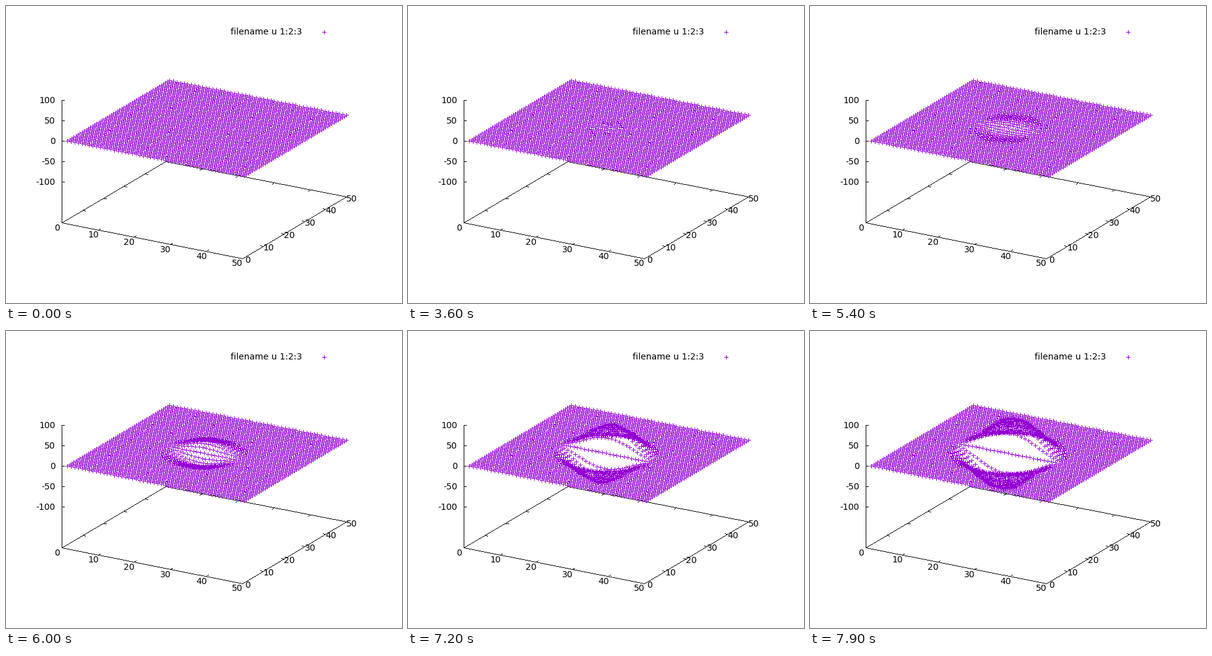
Recreate the animation shown at these times as a matplotlib script. Size 640x480 px, loop 8000 ms.

```python
import numpy as np
import matplotlib.pyplot as plt
from matplotlib.animation import FuncAnimation

plt.rcParams["path.simplify"] = False
plt.rcParams["font.family"] = "DejaVu Sans"

W, H, DPI = 640, 480, 100
FRAMES, STEP = 80, 100
PURPLE = "#9400d3"

# Screen vectors of the projected axes, in pixels
ORIGIN = np.array([90.0, 350.3])
X_AXIS = np.array([291.6, 57.4])
Y_AXIS = np.array([168.4, -99.4])
Z_HEIGHT = 198.5
SPAN = 50
CENTER = 25
TICK = 4.4

fig = plt.figure(figsize=(W / DPI, H / DPI), dpi=DPI, facecolor="white")
ax = fig.add_axes([0, 0, 1, 1])
ax.set_xlim(0, W)
ax.set_ylim(H, 0)
ax.axis("off")


def project(x, y):
    """Position on the base plane in pixels."""
    return (ORIGIN[0] + (x * X_AXIS[0] + y * Y_AXIS[0]) / SPAN,
            ORIGIN[1] + (x * X_AXIS[1] + y * Y_AXIS[1]) / SPAN)


def stroke(xs, ys, color="black"):
    line, = ax.plot(xs, ys, color=color, lw=72 / DPI, antialiased=False,
                    solid_capstyle="butt", snap=False)
    return line


def segment(p, q):
    """Jagged one-pixel line, drawn as a row of whole pixels."""
    p, q = np.rint(p), np.rint(q)
    n = int(np.abs(q - p).max()) + 1
    xs, ys = np.rint(np.linspace(p, q, n)).T
    gap = np.full(n, np.nan)
    stroke(np.stack([xs, xs + 1, gap], axis=1).ravel(),
           np.repeat(ys + 0.5, 3))


def label(x, y, text, ha="center"):
    ax.text(x, y + 5, text, ha=ha, va="baseline", fontsize=14 * 72 / DPI)


def crosses(cx, cy):
    """Broken polyline of 7-pixel plus signs centred on whole pixels."""
    cx, cy = np.rint(cx).ravel(), np.ceil(cy).ravel()
    gap = np.full(cx.shape, np.nan)
    xs = np.stack([cx - 3, cx + 4, gap, cx + 0.5, cx + 0.5, gap], axis=1)
    ys = np.stack([cy + 0.5, cy + 0.5, gap, cy - 3, cy + 4, gap], axis=1)
    return xs.ravel(), ys.ravel()


def draw_axes():
    corners = [project(*c) for c in
               ((0, 0), (SPAN, 0), (SPAN, SPAN), (0, SPAN), (0, 0))]
    for p, q in zip(corners, corners[1:]):
        segment(p, q)

    along_y = TICK * Y_AXIS / np.hypot(*Y_AXIS)
    along_x = TICK * X_AXIS / np.hypot(*X_AXIS)
    for i, v in enumerate(range(0, SPAN + 1, 10)):
        if 0 < v < SPAN:
            for pos, tick in (((v, 0), along_y), ((v, SPAN), -along_y),
                              ((SPAN, v), -along_x), ((0, v), along_x)):
                p = np.array(project(*pos))
                segment(p, p + tick)
        label(82.5 + 58.3 * i, 358 + 11.5 * i, str(v))
        label(390.5 + 33.7 * i, 410 - 19.9 * i, str(v))

    x0, y0 = ORIGIN
    segment((x0, y0), (x0, y0 - Z_HEIGHT))
    for v in range(-100, 101, 50):
        y = y0 - Z_HEIGHT * (v + 200) / 300
        segment((x0, y), (x0 + TICK, y))
        label(79.5, np.rint(y), str(v), ha="right")


draw_axes()
label(478.5, 40.5, "filename u 1:2:3", ha="right")
stroke(*crosses(np.array([514.0]), np.array([42.0])), color=PURPLE)

gx, gy = np.meshgrid(np.arange(1, SPAN + 1), np.arange(1, SPAN + 1))
px, py = project(gx, gy)
py = py - Z_HEIGHT * 2 / 3
dy = gy - CENTER
radius = np.hypot(gx - CENTER, dy)
surface = stroke([], [], color=PURPLE)


def lift(t):
    """Upward shift in pixels: a saturating, odd bump that spreads out."""
    if t < 0.3:
        return np.zeros_like(radius)
    height = 59 / (1 + np.exp(-(t - 6.5) / 0.55)) + 0.4 * t
    reach = np.interp(t, [0.3, 2, 3.2, 4.6, 6.4, 7.9],
                      [1.8, 3, 4.5, 9.2, 11.3, 14.6])
    steep = 0.25 + 0.14 * abs(t - 5.4)
    bump = np.clip(1 - (radius / reach) ** 2, 0, None) ** 2
    return height * np.tanh(steep * dy) * bump


def update(i):
    surface.set_data(*crosses(px, py - lift(i * STEP / 1000)))
    return surface,


anim = FuncAnimation(fig, update, frames=FRAMES, interval=STEP,
                     repeat=True, repeat_delay=0)
plt.show()
```
